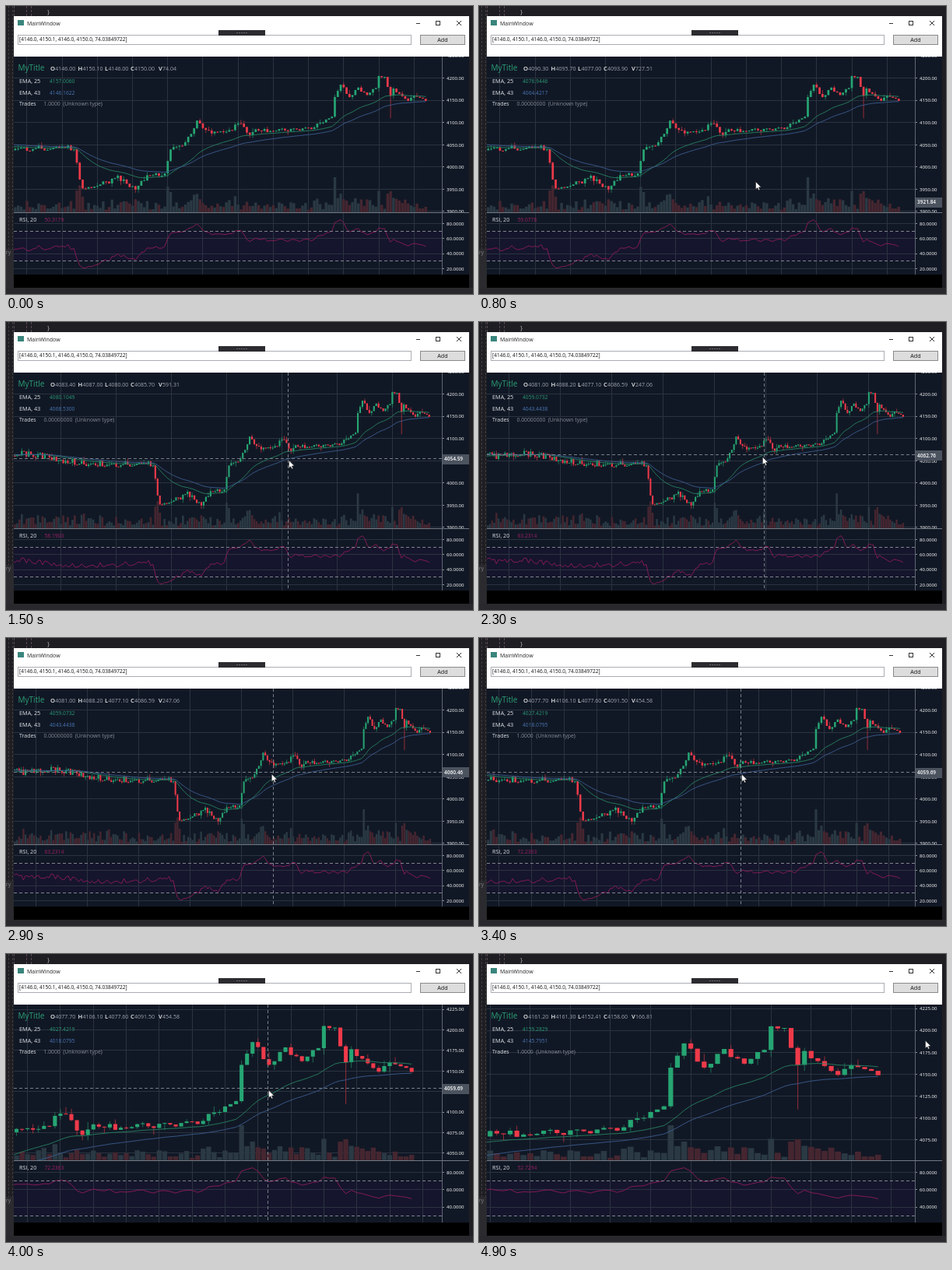
Animation, 600 px wide and 370 px high, one loop 5000 ms. Source, as an HTML page with a canvas:

```html
<!DOCTYPE html>
<html lang="en">
<head>
<meta charset="utf-8">
<title>Chart window</title>
<style>
html, body { margin: 0; width: 100%; height: 100%; overflow: hidden; background: #1f1e23; }
canvas { display: block; width: 600px; height: 370px; }
</style>
</head>
<body>
<canvas id="stage" width="600" height="370"></canvas>
<script>
const g = document.getElementById('stage').getContext('2d');
const LOOP = 5000, LEFT = 10, RIGHT = 560, TOP = 65, SPLIT = 265, BOTTOM = 345, BARS = 205;
const GREEN = '#26a573', RED = '#ee3a4a';

// Turning points of the price: bars back from the newest, close.
const turns = [
  [0, 4150], [4, 4161], [6, 4148], [11, 4176], [12, 4160], [14, 4201], [16, 4205], [17, 4179], [20, 4160],
  [23, 4178], [26, 4156], [29, 4187], [31, 4157], [32, 4114], [39, 4087], [53, 4081], [58, 4084], [60, 4072],
  [64, 4101], [67, 4079], [74, 4080], [78, 4100], [83, 4046], [87, 4043], [89, 3985], [95, 3978], [99, 3952],
  [105, 3976], [116, 3946.5], [118, 3968], [120, 4042], [152, 4044], [174, 4066], [205, 4058]];
// Time, pointer x, price under the pointer.
const pointer = [
  [700, 355, 3921.84], [800, 355.5, 3971], [1100, 363.5, 4054.59], [1700, 363.5, 4054.59],
  [2200, 368.2, 4062.76], [3000, 337.5, 4059.69], [4100, 337.5, 4059.69], [4400, 574, 4124], [4900, 573.5, 4171]];
const visibleBars = [[1000, 146], [1650, 200], [3200, 200], [4000, 78], [4100, 78], [4400, 64]];
// Start, O H L C V, fast EMA, slow EMA, trades, RSI.
const legends = [
  [0, '4146.00 4150.10 4146.00 4150.00 74.04', '4157.0060', '4146.1622', '1.0000', '50.3179'],
  [700, '4090.30 4095.70 4077.00 4093.90 727.51', '4076.9446', '4064.4217', '0.00000000', '59.0778'],
  [1100, '4083.40 4087.00 4080.00 4085.70 591.31', '4080.1049', '4068.5300', '0.00000000', '58.1903'],
  [2000, '4081.00 4088.20 4077.10 4086.59 247.06', '4059.0732', '4043.4438', '0.00000000', '63.2314'],
  [3000, '4077.70 4106.10 4077.60 4091.50 454.58', '4027.4219', '4018.0795', '1.0000', '72.2363'],
  [4300, '4161.20 4161.30 4152.41 4158.60 166.81', '4159.2829', '4145.7951', '1.0000', '52.7294']];

// Value columns at position t, mixed by a given rule between rows.
function at(rows, t, mix = (a, b, f) => a + (b - a) * f) {
  if (t <= rows[0][0]) return rows[0].slice(1);
  const i = rows.findIndex(r => r[0] > t);
  if (i < 0) return rows[rows.length - 1].slice(1);
  const a = rows[i - 1], b = rows[i], f = (t - a[0]) / (b[0] - a[0]);
  return a.slice(1).map((v, c) => mix(v, b[c + 1], f));
}
const geometric = (a, b, f) => a * (b / a) ** f;
const rnd = (k, salt) => {
  const v = Math.sin(k * 12.9898 + salt * 78.233) * 43758.5453;
  return v - Math.floor(v);
};

// Older bars are noisier; a big body brings a big volume.
const trend = k => at(turns, k)[0];
const closeAt = k => trend(k) + (rnd(k, 1) - .5) * (4 + k / 15);
const bars = Array.from({ length: BARS }, (_, k) => {
  const close = closeAt(k), open = closeAt(k + 1);
  const plunge = k === 12 ? 46 : 0;
  return { open, close, up: close >= open, trend: trend(k),
    low: Math.min(open, close) - rnd(k, 2) ** 3 * 9 - plunge,
    high: Math.max(open, close) + rnd(k, 3) ** 3 * 9,
    volume: Math.min(45, 3 + rnd(k, 5) ** 2 * 10 + Math.abs(close - open) * .8) };
});
function addEma(name, period, value) {
  for (let k = BARS - 1; k >= 0; k--) {
    value += (bars[k].close - value) * 2 / (period + 1);
    bars[k][name] = value;
  }
}
function addRsi(period) {
  let gain = 3, loss = 3;
  for (let k = BARS - 1; k >= 0; k--) {
    const change = bars[k].close - bars[k].open;
    gain += (Math.max(change, 0) - gain) / period;
    loss += (Math.max(-change, 0) - loss) / period;
    bars[k].rsi = 100 * gain / (gain + loss);
  }
}
addEma('fast', 25, 4058);
addEma('slow', 43, 4066);
addRsi(20);

function rect(x, y, w, h, color) {
  g.fillStyle = color;
  g.fillRect(x, y, w, h);
}
function frameRect(x, y, w, h, color) {
  g.strokeStyle = color;
  g.lineWidth = 1;
  g.strokeRect(x, y, w, h);
}
function text(s, x, y, size, color, weight = 400, align = 'left') {
  g.font = `${weight} ${size}px "Open Sans", "Noto Sans", sans-serif`;
  g.fillStyle = color;
  g.textAlign = align;
  g.fillText(s, x, y);
  return x + g.measureText(s).width;
}
function line(points, color, width = 1, dash = []) {
  g.beginPath();
  points.forEach(p => g.lineTo(...p));
  g.setLineDash(dash);
  g.strokeStyle = color;
  g.lineWidth = width;
  g.stroke();
  g.setLineDash([]);
}
const crisp = v => Math.floor(v) + .5;
const hline = (y, color, dash, x2 = RIGHT) => line([[LEFT, crisp(y)], [x2, crisp(y)]], color, 1, dash);
const vline = (x, y1, y2, color, dash) => line([[crisp(x), y1], [crisp(x), y2]], color, 1, dash);
function clipped(x, y, w, h, draw) {
  g.save();
  g.beginPath();
  g.rect(x, y, w, h);
  g.clip();
  draw();
  g.restore();
}
// Maps a value range, padded on both sides, to a pane.
function scale(lo, hi, top, bottom) {
  const pad = (hi - lo) * .14, max = hi + pad, min = lo - pad, unit = (bottom - top) / (max - min);
  return { min, max, y: v => top + (max - v) * unit };
}

function drawWindow() {
  rect(0, 0, 600, 370, '#1f1e23');
  rect(0, 312, 10, 58, '#2b2a2f');
  rect(0, 362, 600, 8, '#29282d');
  [3, 8].forEach(x => vline(x, 0, 312, '#403e43', [3, 2]));
  [10, 26, 32].forEach(x => vline(x, 0, 13, '#5b4a5a', [3, 2]));
  text('}', 53, 10, 8, '#b9b9b9');
  text('ry', 0, 319, 6.5, '#858588');
  rect(LEFT, 13, 585, 52, '#fff');
  rect(15, 18, 8, 7, '#39857c');
  text('MainWindow', 27, 24.5, 7, '#222');
  line([[527, 22.5], [532, 22.5]], '#333');
  frameRect(552.5, 19.5, 5, 5, '#333');
  line([[579, 19], [585, 25]], '#333');
  line([[585, 19], [579, 25]], '#333');
  frameRect(15.5, 37.5, 505, 12, '#abadb3');
  text('[4146.0, 4150.1, 4146.0, 4150.0, 74.03849722]', 17, 45, 6.55, '#111');
  rect(532, 37, 58, 13, '#ddd');
  frameRect(532.5, 37.5, 57, 12, '#8a8a8a');
  text('Add', 561, 46, 7.2, '#111', 400, 'center');
  rect(273, 31, 60, 7, '#2c2c30');
  line([[296, 34.5], [311, 34.5]], '#66666b', 1, [2, 1]);
  rect(LEFT, TOP, 585, 281, '#111825');
  rect(LEFT, BOTTOM, 585, 17, '#000');
}

function drawChart(count) {
  const s = (RIGHT - LEFT) / count, x = k => RIGHT - (5.5 + k) * s;
  const shown = bars.slice(0, Math.floor(count - 5.5) + 1);
  const trends = shown.map(b => b.trend), rsis = shown.map(b => b.rsi);
  const price = scale(Math.min(...trends) - 10, Math.max(...trends) + 5, TOP, SPLIT);
  const rsi = scale(Math.min(30, ...rsis), Math.max(70, ...rsis), 266, BOTTOM);
  const curve = (name, map, color) => line(bars.map((b, k) => [x(k), map.y(b[name])]), color, .9);
  const grid = '#2b3340';
  const step = price.max - price.min > 250 ? 50 : 25;
  let gap = 6;
  while (gap * s < 40) gap *= 2;
  const verticals = (y1, y2) => {
    for (let k = 16 % gap - gap; k < BARS; k += gap) vline(x(k), y1, y2, grid);
  };
  const ticks = (map, inc, digits, draw) => {
    for (let v = Math.floor(map.min / inc) * inc; v <= map.max + inc; v += inc) draw(map.y(v), v.toFixed(digits));
  };
  const label = (y, s) => {
    line([[RIGHT, crisp(y)], [RIGHT + 3, crisp(y)]], '#8a9099');
    text(s, 566, y + 2.3, 6.1, '#fff');
  };

  clipped(LEFT, TOP, RIGHT - LEFT, SPLIT - TOP, () => {
    verticals(TOP, SPLIT);
    ticks(price, step, 2, y => hline(y, grid));
    shown.forEach((b, k) => rect(x(k) - s * .45, SPLIT - b.volume, s * .9, b.volume, b.up ? '#2a3943' : '#452630'));
    shown.forEach((b, k) => {
      const color = b.up ? GREEN : RED, w = Math.max(1.5, s * .72);
      const y1 = price.y(Math.max(b.open, b.close)), y2 = price.y(Math.min(b.open, b.close));
      line([[x(k), price.y(b.high)], [x(k), price.y(b.low)]], color, .6);
      rect(x(k) - w / 2, y1, w, Math.max(1, y2 - y1), color);
    });
    curve('fast', price, '#288263');
    curve('slow', price, '#3c5d90');
  });
  clipped(LEFT, 266, RIGHT - LEFT, BOTTOM - 266, () => {
    rect(LEFT, rsi.y(70), RIGHT - LEFT, rsi.y(30) - rsi.y(70), '#15152d');
    verticals(266, BOTTOM);
    ticks(rsi, 20, 4, y => hline(y, grid));
    curve('rsi', rsi, '#8f1b5b');
    [70, 30].forEach(v => hline(rsi.y(v), '#80838d', [4, 3]));
  });
  clipped(RIGHT, TOP, 35, SPLIT - TOP, () => ticks(price, step, 2, label));
  clipped(RIGHT, 266, 35, BOTTOM - 266, () => ticks(rsi, 20, 4, label));
  vline(RIGHT, TOP, BOTTOM, '#5f6671');
  hline(SPLIT, '#737983', [], 595);
}

function drawLegend([, values, fast, slow, trades, rsi]) {
  const bright = '#dfe2e7', dim = '#a0a6b0';
  text('MyTitle', 15.5, 83, 10, '#2ca077');
  values.split(' ').forEach((v, i) => {
    const end = text('OHLCV'[i], [57, 92.5, 127, 160, 196][i], 83, 7.6, '#f2f3f5', 600);
    text(v, end + .3, 83, 7, dim);
  });
  text('EMA, 25', 17, 99, 7.3, bright);
  text(fast, 56, 99, 6.7, '#2b9a76');
  text('EMA, 43', 17, 113.5, 7.3, bright);
  text(slow, 56, 113.5, 6.7, '#4876b4');
  text('Trades', 17, 128, 7, bright);
  const end = text(trades, 48.5, 128, 6.8, '#888e98');
  text('(Unknown type)', end + 3.5, 128, 6.9, '#888e98');
  text('RSI, 20', 17, 276.5, 7.2, bright);
  text(rsi, 49.5, 276.5, 6.7, '#9c2068');
}

// The crosshair trails the pointer by one refresh.
function drawPointer(t) {
  if (t < 600) return;
  const priceY = p => 121 + (4150 - p) * .572;
  const [px, tip] = at(pointer, t), [cx, value] = at(pointer, t - 100);
  const y = priceY(value), color = '#787e88';
  if (t >= 900 && t < 4300) {
    hline(y, color, [4, 3]);
    vline(cx - 1.5, TOP, BOTTOM, color, [4, 3]);
  }
  if (t >= 700 && t < 4300) clipped(RIGHT, TOP, 35, SPLIT - TOP, () => {
    rect(561, Math.round(y) - 6, 34, 13, '#4b535f');
    text(value.toFixed(2), 563, y + 2.6, 6.5, '#fff', 600);
  });
  const arrow = [[0, 0], [0, 9.8], [2.3, 7.8], [3.9, 11], [5.3, 10.3], [3.9, 7.2], [6.9, 7]];
  g.beginPath();
  arrow.forEach(([dx, dy]) => g.lineTo(px + dx, priceY(tip) + 2.3 + dy));
  g.closePath();
  g.fillStyle = '#fff';
  g.fill();
  g.strokeStyle = '#111';
  g.lineWidth = .5;
  g.stroke();
}

function frame(now) {
  const t = Math.floor(now % LOOP / 100) * 100;
  drawWindow();
  drawChart(at(visibleBars, t, geometric)[0]);
  drawLegend(legends.filter(r => r[0] <= t).pop());
  drawPointer(t);
  requestAnimationFrame(frame);
}
requestAnimationFrame(frame);
</script>
</body>
</html>
```
